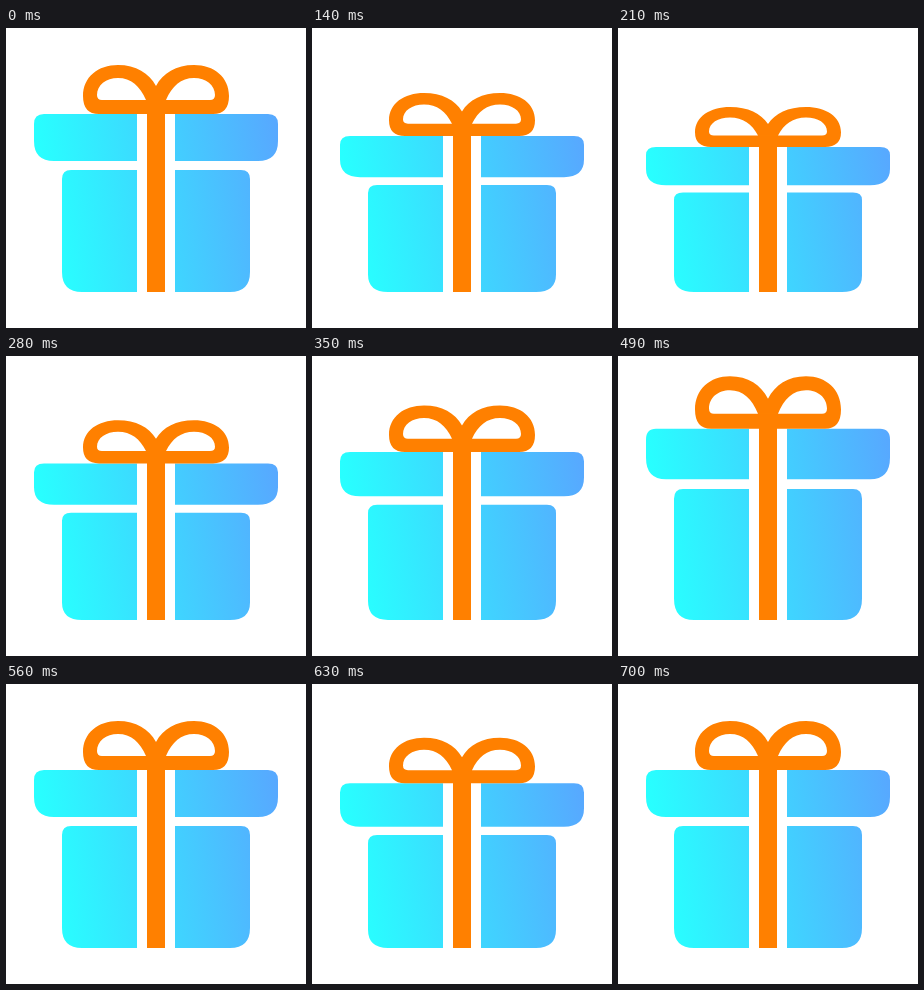
Recreate the animation shown at these times as an HTML page. Size 300 by 300 pixels, loop 2.2 s.

```html
<!DOCTYPE html>
<html lang="en">
<head>
<meta charset="utf-8">
<title>Bouncing gift</title>
<style>
html, body { margin: 0; width: 100%; height: 100%; overflow: hidden; background: #fff; }
svg { display: block; width: 100%; height: 100%; }
</style>
</head>
<body>
<svg viewBox="0 0 300 300">
  <defs>
    <linearGradient id="blue" gradientUnits="userSpaceOnUse" x1="42" y1="190" x2="278" y2="155">
      <stop stop-color="#28ffff"/>
      <stop offset="1" stop-color="#57a9ff"/>
    </linearGradient>
    <path id="loop" fill-rule="evenodd" d="M150 86H93Q77 86 77 68C77 49 92 37 112 37C130 37 143 45 150 58Z
      M140 72H96Q91 72 91 67C91 57 100 50 112 50C125 50 134 58 140 72Z"/>
  </defs>
  <g id="gift">
    <path fill="url(#blue)" d="M131 86H38Q28 86 28 96V113Q28 133 48 133H131Z
      M169 86H262Q272 86 272 96V113Q272 133 252 133H169Z
      M131 142H65Q56 142 56 151V244Q56 264 76 264H131Z
      M169 142H235Q244 142 244 151V244Q244 264 224 264H169Z"/>
    <g fill="#ff8000">
      <use href="#loop"/>
      <use href="#loop" transform="translate(300) scale(-1 1)"/>
      <rect x="141" y="72" width="18" height="192"/>
    </g>
  </g>
</svg>
<script>
const LOOP = 2200, STEP = 70, FLOOR = 264;
// [time in ms, vertical scale], joined by straight lines
const keys = [[0, 1], [210, .815], [490, 1.074], [630, .926], [700, 1], [LOOP, 1]];
const gift = document.getElementById('gift');

function scaleAt(t) {
  const i = keys.findIndex(k => k[0] > t);
  const [t0, s0] = keys[i - 1], [t1, s1] = keys[i];
  return s0 + (s1 - s0) * (t - t0) / (t1 - t0);
}

function draw() {
  const t = performance.now() % LOOP;
  const s = scaleAt(Math.floor(t / STEP) * STEP);
  gift.setAttribute('transform', `translate(0 ${FLOOR * (1 - s)}) scale(1 ${s})`);
  requestAnimationFrame(draw);
}
draw();
</script>
</body>
</html>
```
